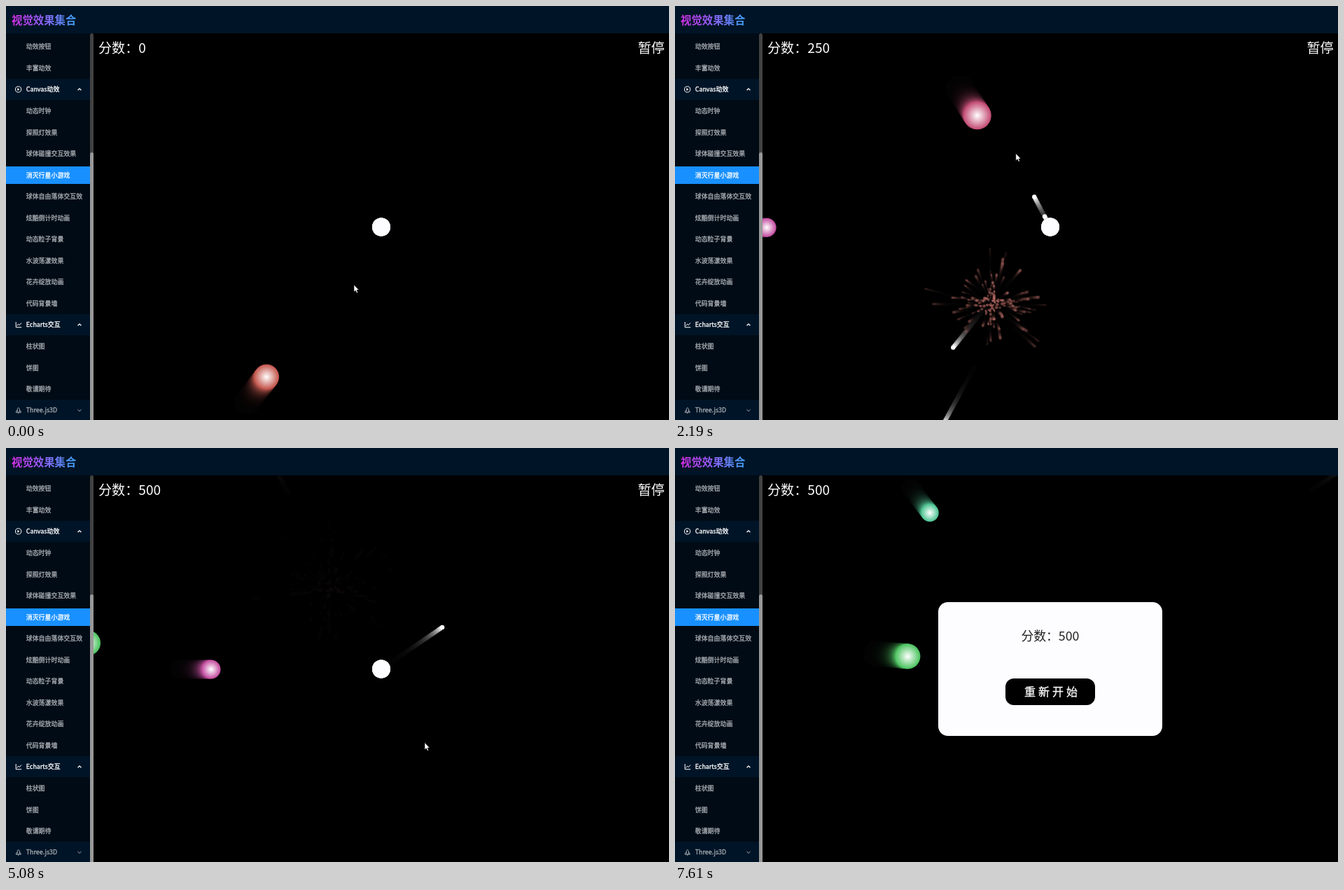
Recreate the animation shown at these times as an HTML page with a canvas. Size 947 by 591 pixels, loop 8210 ms.

```html
<!DOCTYPE html>
<html lang="zh-CN">
<head>
<meta charset="utf-8">
<style>
html, body { margin: 0; width: 100%; height: 100%; overflow: hidden; background: #000; }
body { position: relative; font-family: "Noto Sans CJK SC", "Noto Sans CJK", "Noto Sans", sans-serif; color: #fff; }
body > *, #menu > *, #modal > * { position: absolute; white-space: nowrap; }
canvas, svg { left: 0; top: 0; }
header { left: 0; top: 0; width: 947px; height: 39px; background: #001427; }
header b {
  position: absolute; left: 8px; top: 0; font-size: 15.4px; line-height: 38px;
  background: linear-gradient(90deg, #d42fe6, #8a62f2 50%, #3fa0f5);
  -webkit-background-clip: text; background-clip: text; color: transparent;
}
#menu { left: 0; top: 39px; width: 120px; height: 552px; overflow: hidden; background: #000b15; }
#menu div {
  left: 0; width: 91px; height: 25px; padding-left: 28.7px; line-height: 25px;
  font-size: 8.95px; color: #a6abb0; -webkit-text-stroke: .3px;
}
#menu .group { height: 30.5px; line-height: 30.5px; margin-top: -2.75px; background: #001427; }
#menu .open { color: #fff; }
#menu .on { background: #1890ff; color: #fff; }
#track, #thumb { left: 120px; width: 5px; border-radius: 3px 3px 0 0; }
#track { top: 39px; height: 552px; background: #424242; }
#thumb { top: 209px; height: 382px; background: #989898; }
.hud { top: 45px; font-size: 19.1px; line-height: 28px; }
#modal { left: 376px; top: 220px; width: 320px; height: 191px; border-radius: 14px; background: #fdfdff; }
#note { left: 0; width: 320px; top: 32.5px; text-align: center; color: #222; font-size: 17.8px; line-height: 28px; }
#button {
  left: 96px; top: 109px; width: 101px; height: 38px; padding-left: 27px; border-radius: 12px;
  background: #000; font-size: 16px; line-height: 37px; letter-spacing: 4px; -webkit-text-stroke: .3px;
}
</style>
</head>
<body>
<canvas width="947" height="591"></canvas>
<span class="hud" id="score" style="left:132px"></span>
<span class="hud" id="pause" style="left:902.5px">暂停</span>
<header><b>视觉效果集合</b></header>
<div id="menu"></div>
<div id="track"></div><div id="thumb"></div>
<div id="modal"><div id="note"></div><div id="button"></div></div>
<svg width="947" height="591" fill="none" stroke="#fff" stroke-width="1">
  <circle cx="17.6" cy="119" r="4.1"/><path d="M16.4 117v4l3-2z" fill="#fff" stroke="none"/>
  <path d="M14.2 451v7.7h8M15.6 456.5l2-2.4 1.7 1.5 2.6-3.2"/>
  <path d="M102.6 120.3l2.4-2.4 2.4 2.4M102.6 456.3l2.4-2.4 2.4 2.4" stroke-width="1.3"/>
  <g stroke="#a6abb0">
    <path d="M16.2 580v-4.2q.2-1.6 1.6-2.4 1.4.8 1.6 2.4v4.2zM16.2 577l-1.8 1.6v1.6h1.8M19.4 577l1.8 1.6v1.6h-1.8M17.8 580v2"/>
    <path d="M102.4 576l2.6 2.5 2.6-2.5"/>
  </g>
  <g id="cursor" fill="#fff" stroke="#000" stroke-width=".6">
    <path id="arrow" d="M0 0V10.3L2.3 8.2 3.9 11.7 5.6 11 4.1 7.6H7.2Z"/>
    <path id="hand" d="M-1.2 1Q0-.8 1.2 1V6L7 7Q8 7.4 7.6 9L6.4 15H-.4L-4.4 9.6Q-4.2 8-2.6 8.6L-1.2 9.8Z"/>
  </g>
</svg>
<script>
const $ = id => document.getElementById(id);
const ctx = document.querySelector('canvas').getContext('2d');
const LOOP = 8210, PAUSE = 3420, RESUME = 4615, OVER = 7345;
const STEP = 1000 / 60, TRAIL = 28, VEIL = 'rgba(0,0,0,.16)';
const CX = 536, CY = 315.5, PLANET_SPEED = .0955, BULLET_SPEED = .193, SPARK_LIFE = 950;

const rows = ['动效按钮', '丰富动效', 'Canvas动效', '动态时钟', '探照灯效果', '球体碰撞交互效果', '消灭行星小游戏',
  '球体自由落体交互效', '炫酷倒计时动画', '动态粒子背景', '水波荡漾效果', '花卉绽放动画', '代码背景墙',
  'Echarts交互', '柱状图', '饼图', '敬请期待', 'Three.js3D'];
const rowClass = { 2: 'group open', 6: 'on', 13: 'group open', 17: 'group' };
rows.forEach((label, i) => {
  const row = document.createElement('div');
  row.textContent = label;
  row.className = rowClass[i] || '';
  row.style.top = 6.3 + 30.55 * i + 'px';
  $('menu').append(row);
});

// A planet passes (x, y) at game time `at` on its way to the centre.
const planets = [
  { x: 372, y: 529.5, at: 0, r: 18, hue: 5, hit: 1350, kill: 1440 },
  { x: 405, y: 115.5, at: 1680, r: 20, hue: 340, hit: 2550, kill: 2775 },
  { x: 248.5, y: 316, at: PAUSE, r: 13.5, hue: 318 },
  { x: 194, y: 285.2, at: 4695, r: 18, hue: 130 },
  { x: 364, y: 92.5, at: 6150, r: 12.7, hue: 155 }
];
const bullets = [
  { fire: 537, x: 431, y: 509 },
  { fire: 767, x: 372, y: 529, end: 1440 },
  { fire: 1046, x: 330, y: 571 },
  { fire: 1939, x: 463, y: 177.5 },
  { fire: 2103, x: 478, y: 205, end: 2775 },
  { fire: 3339, x: 623, y: 256 }
];
// Pointer path: time, x, y
const path = [
  [0, 497, 398], [500, 492, 400], [1000, 470, 398], [1560, 468, 204], [1700, 468, 204], [1930, 476, 205],
  [2110, 477, 205], [2700, 668, 311], [2770, 668, 311], [3300, 916, 57], [3960, 916, 57], [4430, 560, 345],
  [4650, 560, 345], [5060, 598, 420.5], [5200, 598, 420], [5850, 500, 351], [6370, 500, 353], [7100, 545, 600]
];

let seed = 7;
const random = () => (seed = seed * 16807 % 2147483647) / 2147483647;
const clamp = v => Math.max(0, Math.min(1, v));

function planetAt(p, g) {
  const dx = CX - p.x, dy = CY - p.y;
  const k = (g - p.at) * PLANET_SPEED / Math.hypot(dx, dy);
  return [p.x + dx * k, p.y + dy * k];
}

function burst(planet, start, count) {
  const [x, y] = planetAt(planet, start);
  const speed = () => (random() - .5) * random() ** 2 * .34;
  const parts = Array.from({ length: count }, () => ({ vx: speed(), vy: speed(), r: .8 + random() * 1.5 }));
  return { x, y, start, parts, color: `hsl(${planet.hue} 55% 66%)` };
}
const bursts = planets.filter(p => p.hit).flatMap(p =>
  [burst(p, p.hit, p.r * 6), burst(p, p.kill, (p.r - 10) * 6)]);

function disc(x, y, r, fill) {
  ctx.fillStyle = fill;
  ctx.beginPath();
  ctx.arc(x, y, r, 0, 2 * Math.PI);
  ctx.fill();
}

function drawScene(g) {
  for (const b of bursts) {
    const age = g - b.start;
    if (age < 0 || age > SPARK_LIFE) continue;
    const reach = 1000 * (1 - Math.exp(-age / 1000));
    ctx.globalAlpha = 1 - age / SPARK_LIFE;
    for (const p of b.parts) disc(b.x + p.vx * reach, b.y + p.vy * reach, p.r, b.color);
    ctx.globalAlpha = 1;
  }
  for (const p of planets) {
    if (g >= p.kill) continue;
    const [x, y] = planetAt(p, g);
    const r = p.r - (p.hit ? 10.5 * clamp((g - p.hit) / 150) : 0);
    if (x < 125 - r || y < 39 - r) continue;
    const shade = ctx.createRadialGradient(x, y, 0, x, y, r);
    shade.addColorStop(0, '#fff');
    shade.addColorStop(1, `hsl(${p.hue} 50% 52%)`);
    disc(x, y, r, shade);
  }
  for (const b of bullets) {
    if (g < b.fire || g >= b.end) continue;
    const dx = b.x - CX, dy = b.y - CY;
    const k = (g - b.fire) * BULLET_SPEED / Math.hypot(dx, dy);
    disc(CX + dx * k, CY + dy * k, 3.2, '#fff');
  }
  disc(CX, CY, 13, '#fdfdff');
}

function moveCursor(t) {
  const i = path.findIndex(p => p[0] > t);
  let [, x, y] = path[path.length - 1];
  if (i > 0) {
    const [t0, x0, y0] = path[i - 1], [t1, x1, y1] = path[i];
    const u = (t - t0) / (t1 - t0), e = u * u * (3 - 2 * u);
    x = x0 + (x1 - x0) * e;
    y = y0 + (y1 - y0) * e;
  }
  const paused = t >= PAUSE && t < RESUME;
  const pointing = (x > 902 && y < 72) || (paused && x < 600 && y > 329);
  $('cursor').setAttribute('transform', `translate(${x} ${y})`);
  $('hand').style.display = pointing ? '' : 'none';
  $('arrow').style.display = pointing ? 'none' : '';
}

function frame(now) {
  const t = now % LOOP;
  const paused = t >= PAUSE && t < RESUME, over = t >= OVER;
  const g = t < RESUME ? Math.min(t, PAUSE) : Math.min(t, OVER) - RESUME + PAUSE;

  // Replay the recent past under a fading veil to leave trails.
  ctx.fillStyle = '#000';
  ctx.fillRect(0, 0, 947, 591);
  for (let k = TRAIL; k >= 0; k--) {
    ctx.fillStyle = VEIL;
    ctx.fillRect(125, 39, 822, 552);
    drawScene(g - k * STEP);
  }

  const points = planets.reduce((s, p) => s + (g >= p.hit ? 100 : 0) + (g >= p.kill ? 150 : 0), 0);
  $('score').textContent = '分数：' + points;
  $('pause').style.display = over ? 'none' : '';
  $('modal').style.display = paused || over ? '' : 'none';
  $('note').textContent = over ? '分数：' + points : '游戏已暂停';
  $('button').textContent = over ? '重新开始' : '继续游戏';
  moveCursor(t);
}

const start = performance.now();
function tick() {
  frame(performance.now() - start);
  requestAnimationFrame(tick);
}
tick();
</script>
</body>
</html>
```
